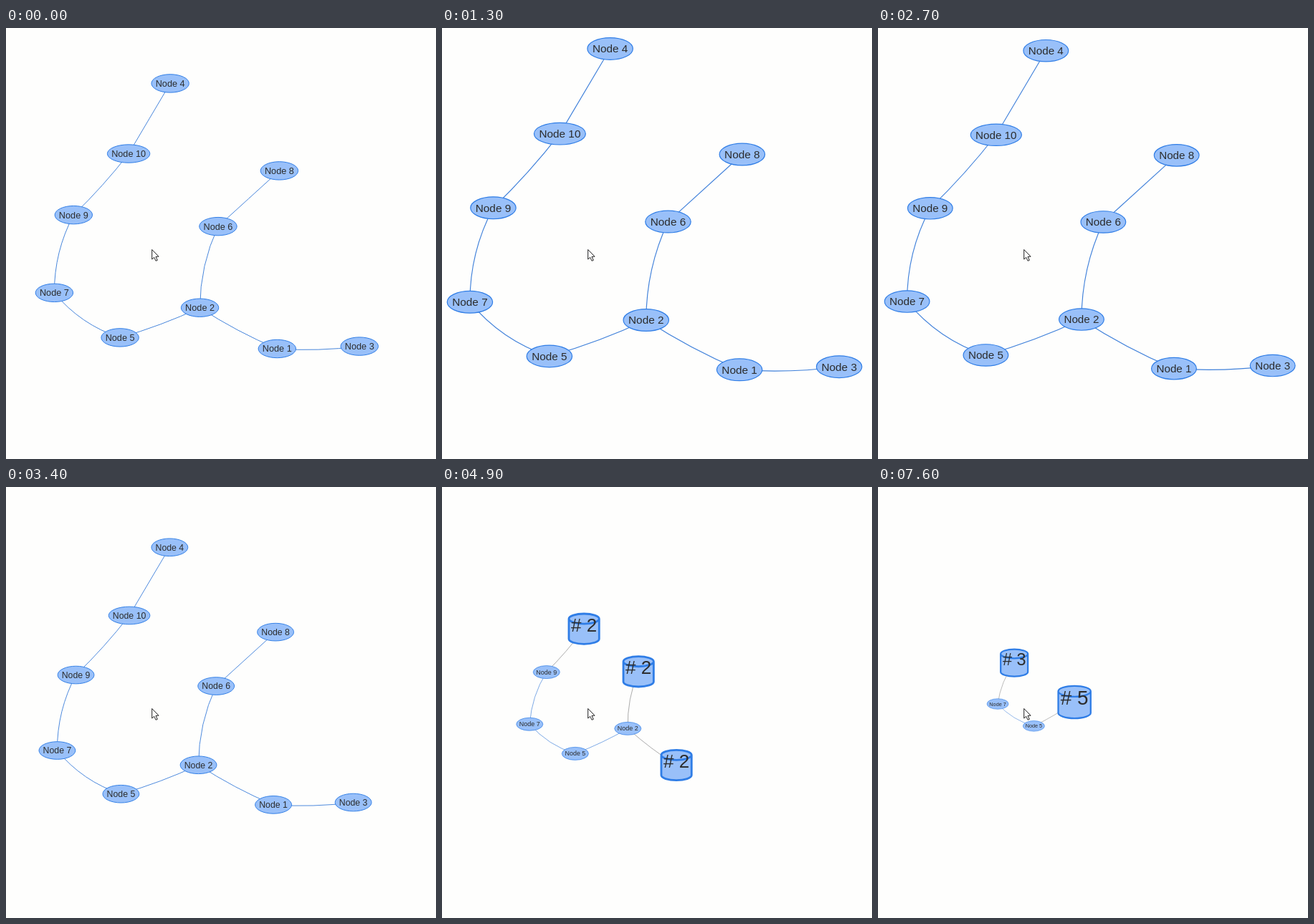
Write an HTML page with a canvas that moves like this. It is 600x602 px and loops after 8 s.

```html
<!DOCTYPE html>
<html lang="en">
<head>
<meta charset="utf-8">
<title>Clustering by zoom</title>
<style>
  html, body { margin: 0; width: 100%; height: 100%; overflow: hidden; background: #fefefd; }
  canvas { display: block; }
</style>
</head>
<body>
<canvas id="stage" width="600" height="602"></canvas>
<script>
const ctx = document.getElementById('stage').getContext('2d');
const LOOP = 8000;
const PIVOT = { x: 203, y: 308.3 };
const BORDER = '#2f7de6', FILL = '#99c0f9', EDGE = '#3f80da', GREY = '#848484', INK = '#2c2c2c';
const FONT = '"Liberation Sans", Arial, sans-serif';

// Wheel steps around the pivot
const ZOOM_IN = [500, 1300, 1700];
const ZOOM_OUT = [2700, 2800, 3400, 3700, 4100, 4500, 5800, 7400];

// At each level all leaves merge into their parents, and the root settles elsewhere
const LEVELS = [
  { from: 0, root: [-43.9, 124.1] },
  { from: 4100, root: [-24.2, 90.6] },
  { from: 5800, root: [25.1, 44.6] }
];

function branch(id, length, heading, bend, turn, ...children) {
  const height = 1 + Math.max(-1, ...children.map(c => c.height));
  const count = 1 + children.reduce((sum, c) => sum + c.count, 0);
  return { id, length, heading, bend, turn, children, height, count };
}

// id, edge length, heading in degrees, edge bend, turn per level
const TREE =
  branch(5, 0, 0, 0, 0,
    branch(7, 111, -145.7, -.145, -1.4,
      branch(9, 112, -76.1, -.125, 4,
        branch(10, 115, -48.1, .036, -1,
          branch(4, 114, -59.4, 0, 0)))),
    branch(2, 119, -20.5, .04, -5,
      branch(6, 116.4, -77.4, -.11, -2,
        branch(8, 115.5, -42.3, 0, 0)),
      branch(1, 122, 28, .045, 9,
        branch(3, 115, -1.7, .05, 0))));

const passed = (times, t) => times.filter(at => t >= at).length;
const scaleAt = t => 1.1 ** passed(ZOOM_IN, t) * .9 ** passed(ZOOM_OUT, t);

// Calls visit(node, x, y, parentX, parentY) for every node still shown
function walk(node, level, x, y, visit, px, py) {
  visit(node, x, y, px, py);
  for (const child of node.children) {
    if (child.height < level) continue;
    const length = child.length - level * (child.height === level ? 2 : 4);
    const angle = (child.heading + child.turn * level) * Math.PI / 180;
    walk(child, level, x + length * Math.cos(angle), y + length * Math.sin(angle), visit, x, y);
  }
}

function label(text, x, y, size) {
  ctx.font = `${size}px ${FONT}`;
  ctx.textAlign = 'center';
  ctx.fillStyle = INK;
  ctx.fillText(text, x, y + size * .345);
}

function paint(width) {
  ctx.fillStyle = FILL;
  ctx.strokeStyle = BORDER;
  ctx.lineWidth = width;
  ctx.fill();
  ctx.stroke();
}

function drawEdge(x0, y0, x1, y1, bend, color) {
  const dx = x1 - x0, dy = y1 - y0;
  ctx.beginPath();
  ctx.moveTo(x0, y0);
  ctx.quadraticCurveTo(x0 + dx / 2 - dy * bend, y0 + dy / 2 + dx * bend, x1, y1);
  ctx.strokeStyle = color;
  ctx.lineWidth = .95;
  ctx.stroke();
}

function drawNode(id, x, y) {
  ctx.beginPath();
  ctx.ellipse(x, y, id > 9 ? 29.7 : 26.2, 12.7, 0, 0, Math.PI * 2);
  paint(1);
  label('Node ' + id, x, y, 12.7);
}

function drawCluster(count, x, y) {
  const size = 47 + 6.4 * count;
  const r = size / 2, ry = size / 6;
  const top = y - r + ry, bottom = y + r - ry;
  ctx.beginPath();
  ctx.ellipse(x, top, r, ry, 0, 0, Math.PI * 2);
  ctx.lineTo(x + r, bottom);
  ctx.ellipse(x, bottom, r, ry, 0, 0, Math.PI);
  ctx.lineTo(x - r, top);
  paint(4);
  label('# ' + count, x, y - size * .13, size * .615);
}

function drawCursor() {
  const arrow = [[0, 0], [0, 13.5], [3, 10.8], [5.4, 15.8], [7.6, 14.8], [5.3, 9.9], [9.4, 9.7]];
  ctx.beginPath();
  arrow.forEach(([x, y]) => ctx.lineTo(203.7 + x, 309.5 + y));
  ctx.closePath();
  ctx.fillStyle = '#fff';
  ctx.strokeStyle = '#222';
  ctx.lineWidth = 1;
  ctx.fill();
  ctx.stroke();
}

function draw(t) {
  const s = scaleAt(t);
  const level = passed(LEVELS.map(l => l.from), t) - 1;
  const [x, y] = LEVELS[level].root;
  const isCluster = node => level > 0 && node.height === level;

  ctx.setTransform(1, 0, 0, 1, 0, 0);
  ctx.fillStyle = '#fefefd';
  ctx.fillRect(0, 0, 600, 602);

  ctx.setTransform(s, 0, 0, s, PIVOT.x, PIVOT.y);
  walk(TREE, level, x, y, (node, x, y, px, py) => {
    if (node !== TREE) drawEdge(px, py, x, y, node.bend, isCluster(node) ? GREY : EDGE);
  });
  walk(TREE, level, x, y, (node, x, y) => {
    if (isCluster(node)) drawCluster(node.count, x, y);
    else drawNode(node.id, x, y);
  });

  ctx.setTransform(1, 0, 0, 1, 0, 0);
  drawCursor();
}

const start = performance.now();
function tick() {
  draw((performance.now() - start) % LOOP);
  requestAnimationFrame(tick);
}
tick();
</script>
</body>
</html>
```
